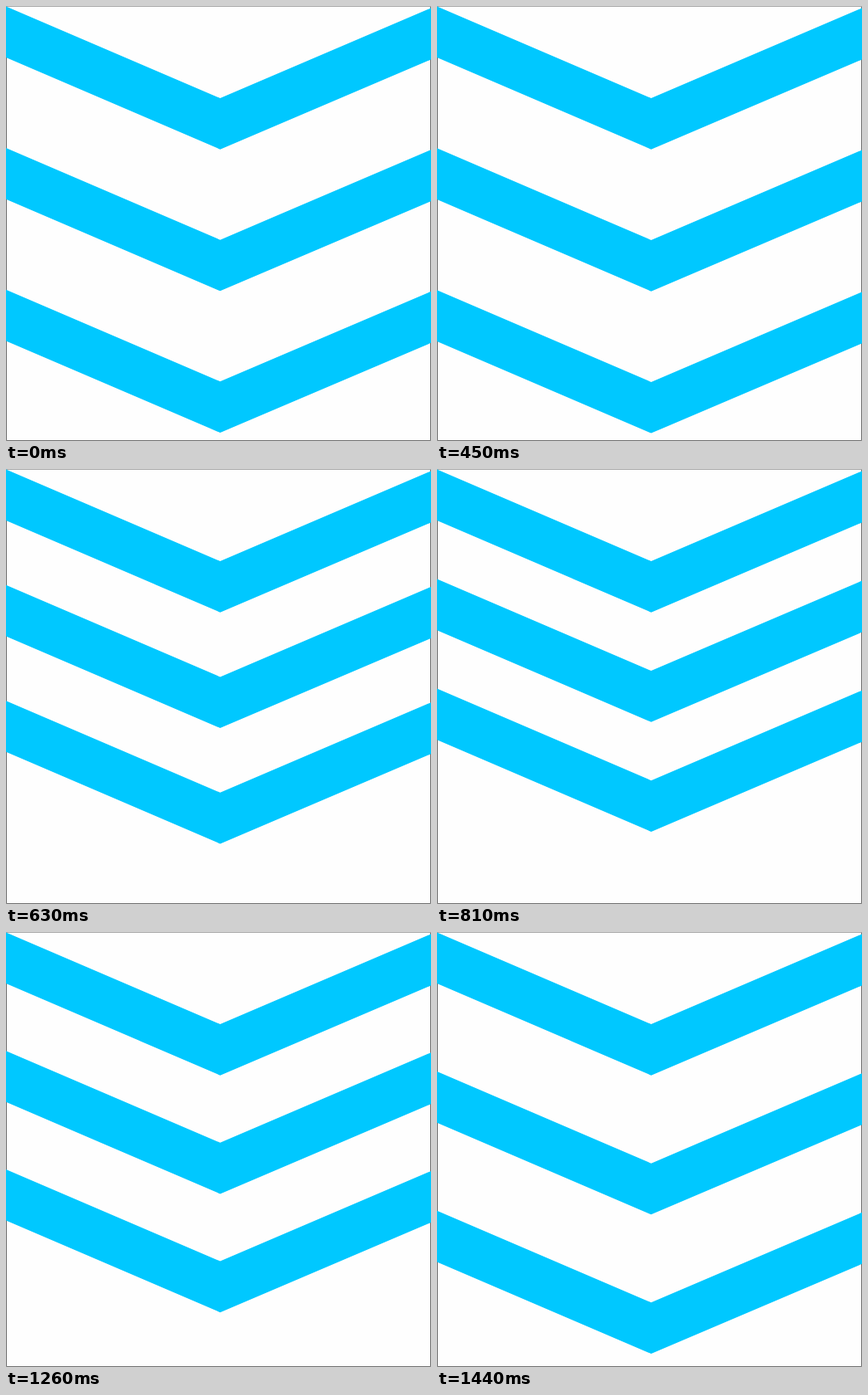
Animation, 512 px wide and 524 px high, one loop 1.53 s. Source, as an HTML page:

```html
<!DOCTYPE html>
<html lang="en">
<head>
<meta charset="utf-8">
<title>Chevrons</title>
<style>
  html, body { margin: 0; width: 100%; height: 100%; overflow: hidden; background: #fefefe; }
  svg { display: block; width: 512px; height: 524px; }
</style>
</head>
<body>
<svg viewBox="0 0 512 524">
  <defs>
    <path id="chevron" fill="#00c8ff" d="M0 .4 258 111 512 2.5V64.5L258 172.7 0 62.1Z"/>
  </defs>
  <g fill="none" stroke="#6e6e6e">
    <path d="M.5 0V523.5H511.5V0"/>
    <path d="M0 .5H512" stroke="#a8a8a8"/>
  </g>
  <use href="#chevron"/>
  <use href="#chevron" class="follow"/>
  <use href="#chevron" class="follow"/>
</svg>
<script>
  const LOOP = 1530, TICK = 90;
  const CLOSE_AT = 433, OPEN_AT = 1191;
  const FAR = 172.1, NEAR = 131.2, RATE = 0.0152;
  const followers = document.querySelectorAll('.follow');
  const begin = performance.now();

  // Critically damped spring from 0 to 1
  function spring(ms) {
    const u = Math.max(0, ms) * RATE;
    return 1 - (1 + u) * Math.exp(-u);
  }

  function gapAt(t) {
    if (t < CLOSE_AT) t += LOOP;
    return FAR - (FAR - NEAR) * (spring(t - CLOSE_AT) - spring(t - OPEN_AT));
  }

  function draw(now) {
    const t = Math.max(0, now - begin) % LOOP;
    const gap = gapAt(Math.floor(t / TICK) * TICK);
    followers.forEach((el, i) => el.setAttribute('y', gap * (i + 1)));
    requestAnimationFrame(draw);
  }
  draw(begin);
</script>
</body>
</html>
```
